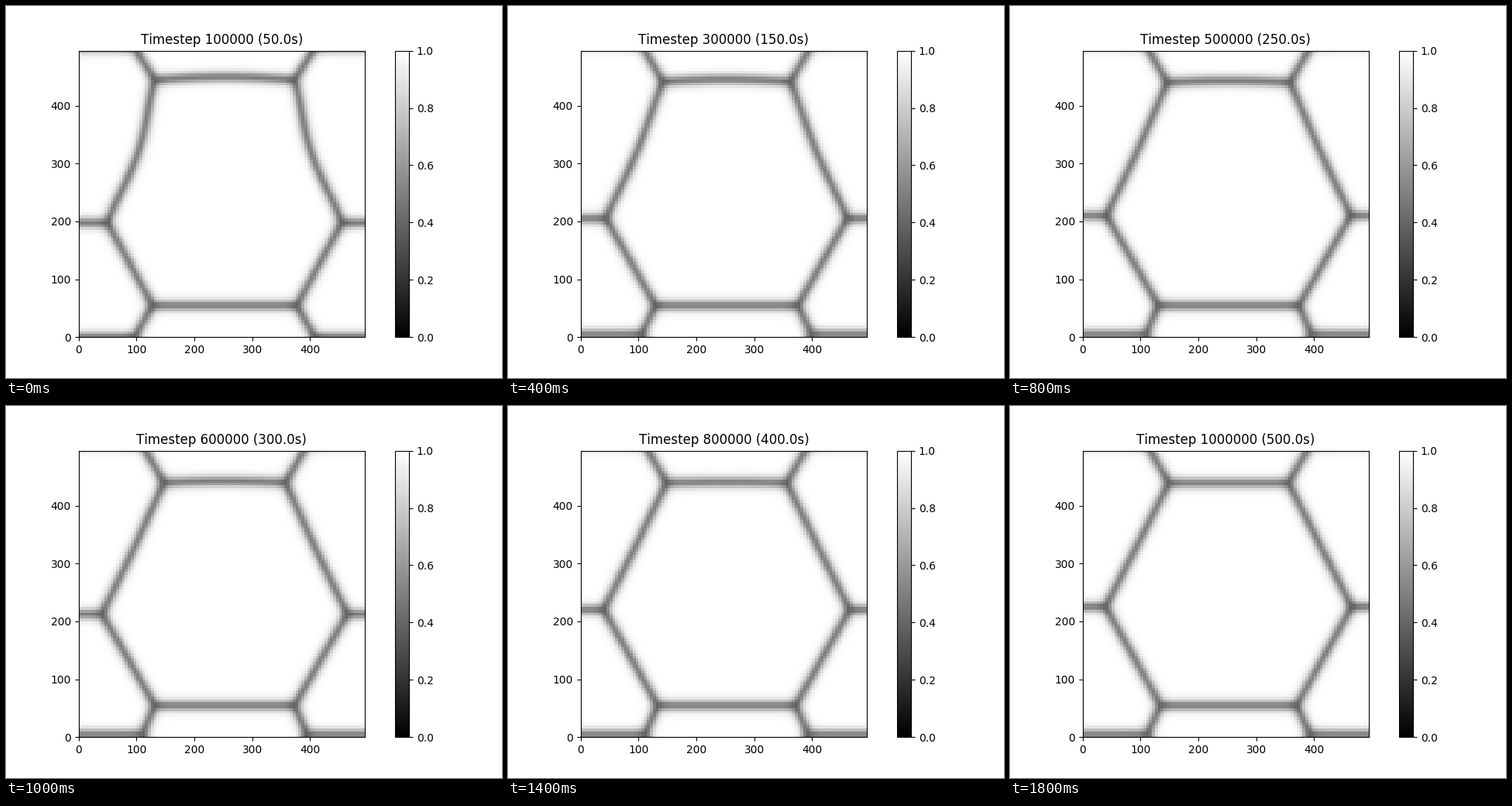
A matplotlib script for the animation above (2 s loop, 640 by 480 pixels).

```python
import numpy as np
import matplotlib.pyplot as plt
from matplotlib.animation import FuncAnimation
from matplotlib.path import Path

W, H = 640, 480
FRAMES = 10
CELL, CELLS, PERIOD = 5, 99, 500
MID = 252.5          # mirror axis of the central grain
SHARPNESS = 0.115    # inverse half-width of a grain boundary
JUNCTION = 0.78      # how strongly overlapping grains share a junction
RELAX = 2.3          # relaxation time of the corners, in frames

plt.rcParams["text.kerning_factor"] = 6

edges = np.arange(CELLS + 1) * CELL
centres = edges[:-1] + CELL / 2
gx, gy = np.meshgrid(centres, centres)
points = np.column_stack([gx.ravel(), gy.ravel()])


def relax(start, end, i):
    return end + (start - end) * np.exp(-i / RELAX)


def snap(value, step=CELL / 2):
    """Boundaries along the grid stay pinned to half cells."""
    return step * round(value / step)


def bent(a, b, bend, power, count=25):
    """Line from a to b, bowed by the vector bend at its middle."""
    t = np.linspace(0, 1, count)[:, None]
    return a + (b - a) * t + (4 * t * (1 - t)) ** power * np.array(bend)


def mirrored(half, axis):
    """Close a half outline with its mirror image about x = axis."""
    other = half[::-1] * [-1, 1] + [2 * axis, 0]
    return np.vstack([half, other])


def grains(i):
    up = np.array([0, PERIOD])
    right = np.array([PERIOD, 0])
    side = np.array([relax(50, 39.5, i), snap(198 + 3.1 * i)])
    top = np.array([relax(132, 149.5, i), relax(444, 439, i)])
    low = np.array([128 + 0.8 * i, 54.7])
    base = np.array([relax(97, 112, i), min(2.5 * i, 5)])

    flank = bent(side, top, (relax(12.5, 0, i), 0), power=2)
    top_right = np.array([2 * MID - top[0], top[1]])
    rise = 5.5 * (1 - i / (FRAMES - 1))
    arch = bent(top, top_right, (0, rise), power=1)
    arch = arch[:len(arch) // 2 + 1]
    left_axis = MID - PERIOD / 2

    centre = mirrored(np.vstack([low, flank, arch[1:]]), MID)
    cap = mirrored(np.vstack([low + up, base + up, arch]), MID)
    lower = mirrored(np.vstack([base, low, side]), left_axis)
    upper = mirrored(np.vstack([flank, base + up]), left_axis)

    shapes = [centre, cap, cap - up]
    for dx in (0 * right, right):
        shapes += [lower + dx, lower + dx + up, upper + dx, upper + dx - up]
    return shapes


def signed_distance(poly):
    """Distance from every cell centre to the outline, positive inside."""
    step = np.roll(poly, -1, axis=0) - poly
    length2 = np.maximum((step ** 2).sum(axis=1), 1e-12)
    rx = points[:, :1] - poly[:, 0]
    ry = points[:, 1:] - poly[:, 1]
    t = np.clip((rx * step[:, 0] + ry * step[:, 1]) / length2, 0, 1)
    gap2 = (rx - t * step[:, 0]) ** 2 + (ry - t * step[:, 1]) ** 2
    dist = np.sqrt(gap2.min(axis=1))
    closed = Path(np.vstack([poly, poly[:1]]))
    return np.where(closed.contains_points(points), dist, -dist)


def field(i):
    """Sum of squared order parameters, one parameter per grain."""
    s = np.array([signed_distance(g) for g in grains(i)])
    eta = (1 + np.tanh(SHARPNESS * s)) / 2
    eta /= eta.sum(axis=0) ** JUNCTION
    return (eta ** 2).sum(axis=0).reshape(CELLS, CELLS)


def title_text(i):
    return f"Timestep {(i + 1) * 100000} ({(i + 1) * 50.0}s)"


fig = plt.figure(figsize=(W / 100, H / 100), dpi=100)
ax = fig.add_axes([93.6 / W, 0.11, 369.6 / W, 0.77])
cax = fig.add_axes([501.6 / W, 0.11, 18.48 / W, 0.77])
mesh = ax.pcolormesh(edges, edges, field(0), cmap="gray", vmin=0, vmax=1)
title = ax.set_title(title_text(0))
fig.colorbar(mesh, cax=cax)


def update(i):
    mesh.set_array(field(i))
    title.set_text(title_text(i))
    return mesh, title


anim = FuncAnimation(fig, update, frames=FRAMES, interval=200, repeat=True)
plt.show()
```
